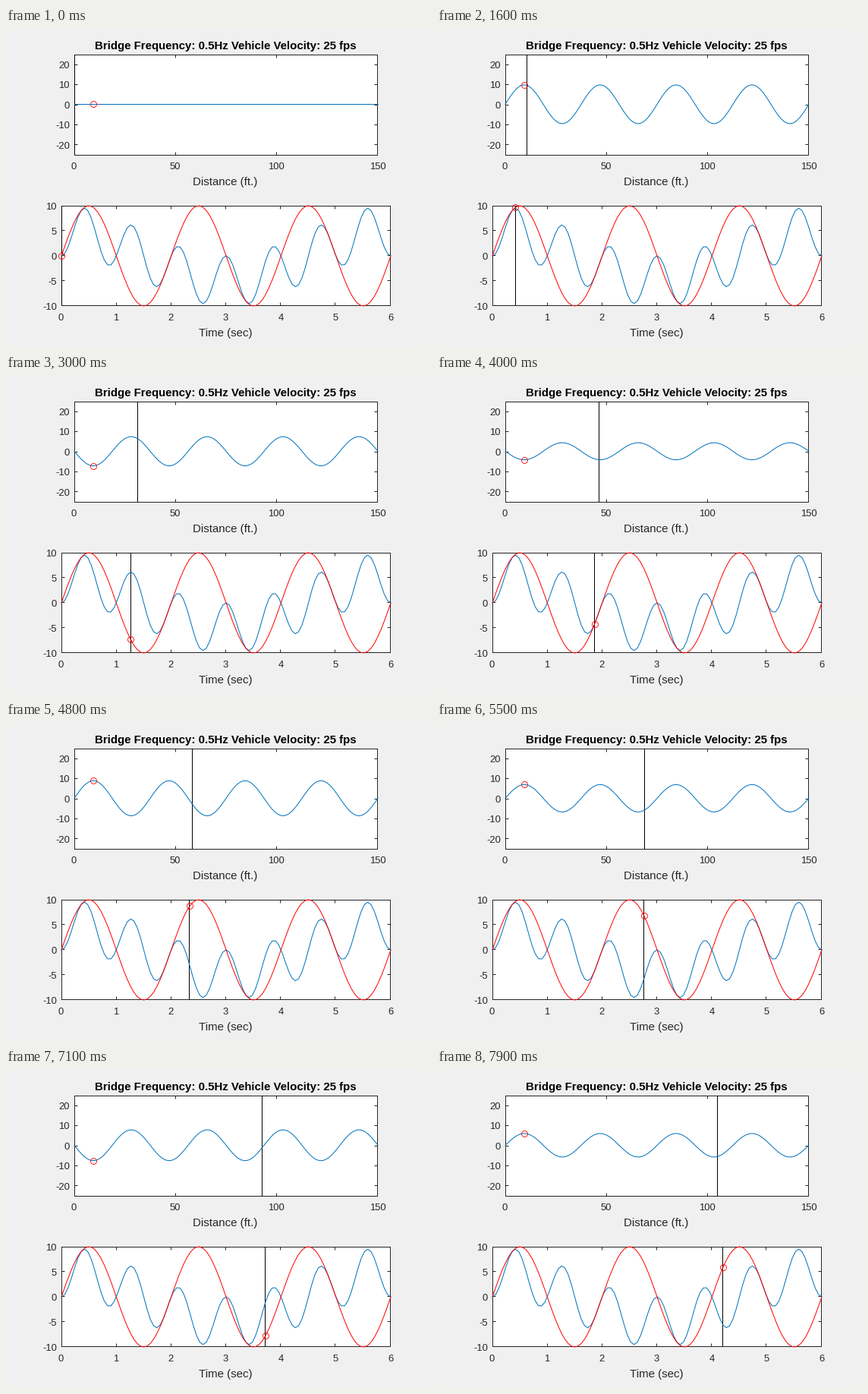
These frames come from a looping animation (560x420 px, 8000 ms). A matplotlib script:

```python
import numpy as np
import matplotlib.pyplot as plt
from matplotlib.animation import FuncAnimation

W, H, DPI = 560, 420, 100
PX = 72 / DPI                      # points per pixel
INK, BLUE, RED = "#262626", "#0072bd", "#ff0000"
SPEED, FREQ, SPAN, WAVES = 25, 0.5, 150, 4
STEP, HOLD, FRAMES = 0.06, 9, 80   # seconds per step, still steps, total

plt.rcParams.update({
    "font.family": "Liberation Sans",
    "lines.linewidth": PX,
    "axes.linewidth": PX,
    "axes.edgecolor": INK,
})

fig = plt.figure(figsize=(W / DPI, H / DPI), dpi=DPI, facecolor="#f0f0f0")


def label(x, y, text, size=13, color=INK, ha="center", weight="normal"):
    fig.text(x / W, 1 - y / H, text, fontsize=size * PX, color=color,
             ha=ha, va="baseline", weight=weight)


def axes(left, top, right, bottom, xmax, ymax, **style):
    box = [left / W, 1 - bottom / H, (right - left) / W, (bottom - top) / H]
    return fig.add_axes(box, xlim=(0, xmax), ylim=(-ymax, ymax), **style)


def panel(left, top, right, bottom, xmax, ymax, xticks, yticks):
    """Return the framed axes and a bare layer for curves above the frame."""
    # The frame lies on the outermost pixels inside the plot area.
    x0, y0 = round(left) - 0.4, round(top + 0.2) - 0.4
    x1, y1 = round(right) - 1.4, round(bottom + 0.2) - 0.4
    if bottom == round(bottom):
        y1 -= 1
    frame = axes(x0, y0, x1, y1, xmax, ymax, xticks=xticks, yticks=yticks)
    frame.tick_params(direction="in", length=4 * PX, width=PX, color=INK,
                      top=True, right=True, labelbottom=False,
                      labelleft=False)
    for v in xticks:
        label(left + (right - left) * v / xmax - 0.5, bottom + 19.3, str(v))
    for v in yticks:
        y = (top + bottom) / 2 - (bottom - top) / 2 * v / ymax
        label(left - 6, round(y + 0.3) + 5, str(v), ha="right")
    layer = axes(left, top, right, bottom, xmax, ymax, zorder=2)
    layer.set_axis_off()
    return frame, layer


def curve(ax, x, y, color):
    return ax.plot(x, y, color=color, clip_on=False)[0]


def ring(ax):
    return ax.plot([], [], "o", ms=8 * PX, mew=0.85 * PX, mec=RED,
                   mfc="none", clip_on=False, zorder=4)[0]


def cursor(ax):
    return ax.axvline(0, color="black", zorder=5)


def sway(t):
    return 10 * np.sin(2 * np.pi * FREQ * t)


def shape(x):
    return np.sin(2 * np.pi * WAVES * x / SPAN)


time = np.arange(101) * STEP
dist = SPEED * time

deck_frame, deck = panel(90, 34.4, 490, 166.4, SPAN, 25,
                         range(0, 151, 50), range(-20, 21, 10))
trace_frame, trace = panel(73, 234, 507, 366, 6, 10,
                           range(0, 7), range(-10, 11, 5))

label(289.5, 28, "Bridge Frequency: 0.5Hz Vehicle Velocity: 25 fps", 15,
      "black", weight="bold")
label(288.5, 207, "Distance (ft.)", 15)
label(289, 406, "Time (sec)", 15)

wave = curve(deck, dist, 0 * dist, BLUE)
curve(trace, time, sway(time) * shape(dist), BLUE)
curve(trace, time, sway(time), RED)

deck_ring, trace_ring = ring(deck), ring(trace)
deck_line, trace_line = cursor(deck_frame), cursor(trace_frame)
crest = SPAN / WAVES / 4


def draw(i):
    t = max(0, i - HOLD) * STEP
    level = sway(t)
    wave.set_ydata(level * shape(dist))
    deck_ring.set_data([crest], [level])
    trace_ring.set_data([t], [level])
    deck_line.set_xdata([SPEED * t] * 2)
    trace_line.set_xdata([t] * 2)
    return wave, deck_ring, trace_ring, deck_line, trace_line


anim = FuncAnimation(fig, draw, frames=FRAMES, interval=100,
                     repeat=True, repeat_delay=0)
plt.show()
```
